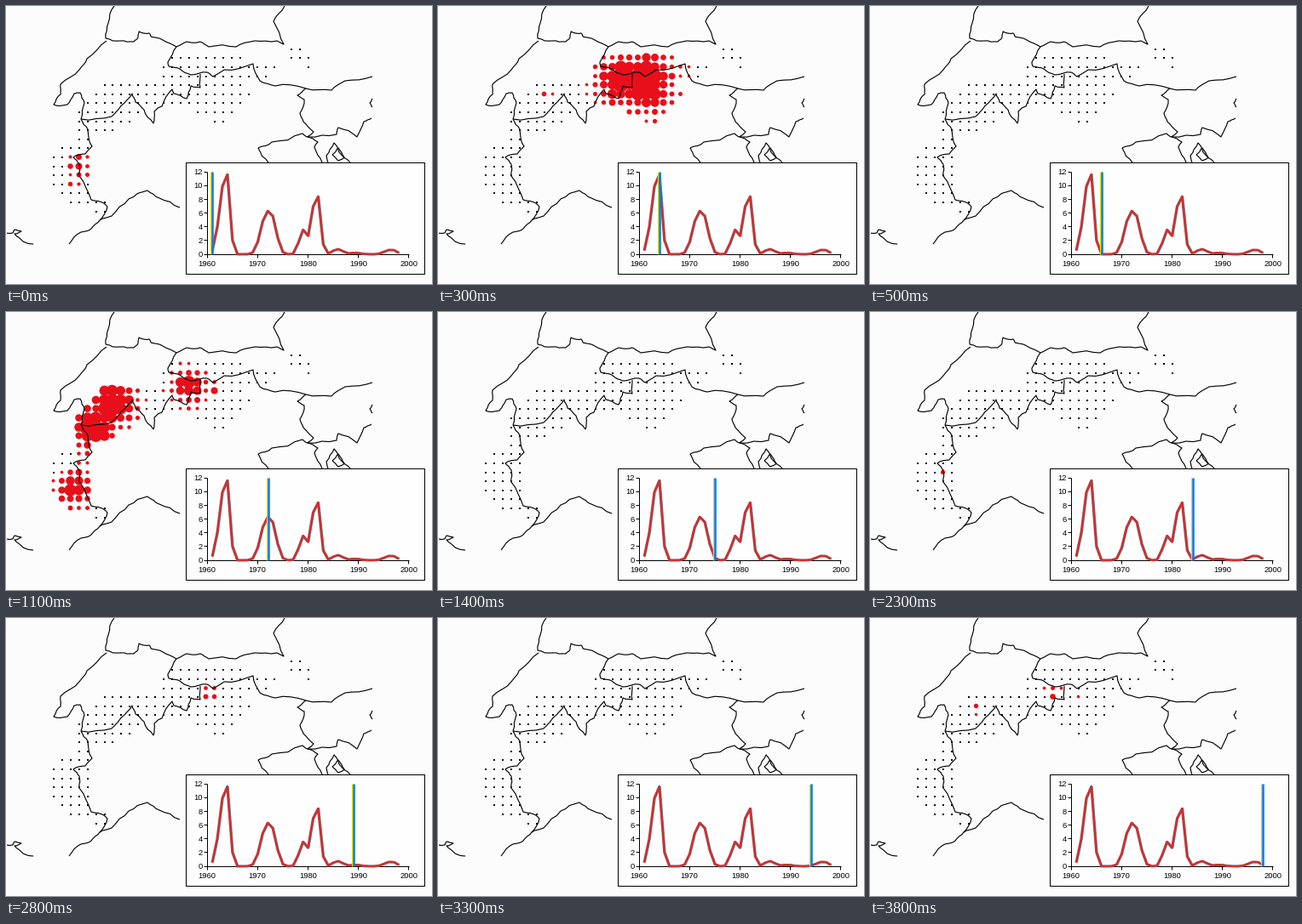
A matplotlib script for the animation above (3.9 s loop, 500 by 327 pixels).

```python
import numpy as np
import matplotlib.pyplot as plt
from matplotlib.animation import FuncAnimation
from matplotlib.patches import Rectangle
from matplotlib.path import Path

W, H, DPI = 500, 327, 100
PX = 72 / DPI
RED = "#e80f1a"

# Outlines of the survey areas, in grid columns and rows
AREAS = [
    [(12.5, 1.5), (15.5, .5), (21.5, .5), (23, 1.4), (26.5, 1.5), (25.5, 3.5),
     (22.5, 3.5), (23.5, 5.2), (21, 7.5), (20, 8.5), (16.5, 7.4), (16.5, 6.5),
     (10.5, 6.5), (10.3, 7.5), (7, 9.5), (4.4, 9.5), (4.4, 16.5), (6.5, 16.6),
     (6.5, 18.4), (4.6, 18.4), (4.5, 17.5), (1.6, 17.5), (-.4, 14.5),
     (-.4, 12.6), (.6, 10.6), (2.6, 10.2), (2.5, 7.4), (6.4, 3.6), (12.5, 3.5)],
    [(27.5, -.5), (29.5, -.5), (30.5, 1), (30.5, 2.5), (29.6, 2.5), (29.4, 1.5),
     (27.5, 1.5)],
]
grid = np.array([(c, r) for r in range(19) for c in range(31)], float)
cells = grid[np.any([Path(a).contains_points(grid) for a in AREAS], axis=0)]
sites = np.floor([55.2, 50.2] + cells * [9.97, 10.6]) + .5

# Peaks of the outbreak index: year, height, years of rise and of fall
PEAKS = [(1963.9, 11.7, 1.85, .88), (1972.2, 6.35, 2, 1.8),
         (1979.1, 3.5, 1.2, .8), (1981.8, 8.6, 1.5, .95), (1986, .75, 1.5, 1.2),
         (1989.3, .2, 1.5, 1.5), (1996.5, .65, 1.8, 1.4)]
# Each wave runs along the route (column, row) between two years
ROUTE = [(3, 13), (2.5, 15), (4.6, 8), (7, 5.2), (16, 3.5), (18.6, 3.7)]
WAVES = [(1961, 1964.2), (1971.1, 1972.9), (1978.8, 1982), (1984, 1989),
         (1996, 1998.6)]


def index(year):
    year = np.asarray(year, float)
    return sum(h * np.exp(-(np.abs(year - p) / np.where(year < p, rise, fall)) ** 2.5)
               for p, h, rise, fall in PEAKS)


def radii(year):
    strength = 6 * index(year) ** .27
    size = np.zeros(len(cells))
    for wave in WAVES:
        for centre, peak in zip(ROUTE, np.linspace(*wave, len(ROUTE))):
            top = strength * np.exp(-(year - peak) ** 2)
            reach = .4 + .17 * top
            dist = np.hypot(*(cells - centre).T)
            size = np.maximum(size, top / (1 + (dist / reach) ** 2))
    size *= np.random.RandomState(year).uniform(.75, 1.15, len(cells))
    return np.where(size > 1.7, np.minimum(size, 9.5), 0)


BORDERS = [
    # Switzerland, north
    [(127, 0), (120, 20), (117, 38), (134, 41), (150, 42), (155, 37), (156, 30),
     (168, 32), (170, 36), (184, 40), (200, 48)],
    # Germany and Austria
    [(200, 48), (212, 42), (228, 42), (238, 48), (270, 48), (292, 41), (318, 41),
     (326, 45), (314, 18), (327, 0)],
    # Austria, south
    [(200, 48), (190, 66), (191, 71), (204, 74), (217, 81), (236, 78), (243, 83),
     (256, 75), (290, 68), (298, 88), (316, 94), (352, 97), (382, 99), (398, 88),
     (430, 83)],
    # Switzerland, west
    [(118, 41), (95, 62), (86, 75), (64, 92), (64, 104), (56, 116), (72, 116),
     (80, 103), (87, 102), (92, 114), (88, 133)],
    # Switzerland, south
    [(88, 133), (124, 130), (139, 114), (148, 103), (152, 113), (162, 122),
     (173, 138), (174, 124), (183, 118), (195, 98), (197, 103), (212, 109),
     (217, 94), (228, 96), (228, 80)],
    # France and Italy
    [(88, 133), (96, 145), (101, 165), (93, 174), (79, 178), (86, 186), (86, 200),
     (100, 228), (115, 232), (119, 236), (110, 252)],
    # Coasts
    [(74, 280), (88, 266), (100, 262), (110, 252), (124, 247), (144, 227),
     (166, 217), (180, 226), (204, 237)],
    [(1, 267), (8, 267), (10, 263), (18, 265), (10, 268), (20, 277), (32, 280)],
    [(354, 154), (348, 150), (312, 160), (296, 167), (308, 184)],
    # Slovenia and Croatia
    [(352, 97), (342, 105), (350, 110), (345, 126), (349, 136), (361, 148),
     (354, 154), (388, 151), (390, 143), (412, 154), (420, 136), (429, 132)],
    [(354, 154), (366, 160), (362, 166), (371, 184)],
    [(378, 184), (376, 176), (385, 161), (391, 172), (404, 184)],
    [(383, 175), (390, 167), (397, 178), (390, 182), (383, 175)],
    [(430, 109), (427, 114), (430, 119)],
]


def roughen(points, rng, levels=2):
    """Displace segment midpoints in proportion to segment length."""
    p = np.array(points, float)
    for _ in range(levels):
        step = np.diff(p, axis=0)
        shift = rng.uniform(-.09, .09, (len(step), 1)) * step[:, ::-1] * [-1, 1]
        out = np.empty((2 * len(p) - 1, 2))
        out[::2], out[1::2] = p, p[:-1] + step / 2 + shift
        p = out
    return p


def chart_x(year):
    return 236 + 5.92 * (np.asarray(year) - 1960)


def chart_y(value):
    return 292 - 8.05 * np.asarray(value)


fig = plt.figure(figsize=(W / DPI, H / DPI), dpi=DPI, facecolor="#fcfcfc")
ax = fig.add_axes([0, 0, 1, 1])
ax.set(xlim=(0, W), ylim=(H, 0))
ax.axis("off")


def stroke(xs, ys, color="black", width=1.0, z=3):
    return ax.plot(xs, ys, color=color, lw=width * PX, zorder=z,
                   solid_joinstyle="round", solid_capstyle="butt")[0]


def label(x, y, text, align):
    ax.text(x, y, text, ha=align, va="center_baseline", zorder=6,
            family="Liberation Sans", size=9.4 * PX)


ax.scatter(*sites.T, s=(1.9 * PX) ** 2, c="black", marker="s", lw=0, zorder=1)
blobs = ax.scatter(*sites.T, s=0, c=RED, lw=0, zorder=2)

rng = np.random.RandomState(4)
for border in BORDERS:
    stroke(*roughen(border, rng).T, width=1.15)

# Chart panel
ax.add_patch(Rectangle((210.5, 183.5), 280, 131, fc="#fefefe", ec="black",
                       lw=PX, zorder=4))
left, base = 235.5, 291.5
stroke([left, left], [195, base], z=5)
stroke([left, 472.5], [base, base], z=5)
for value in range(0, 13, 2):
    y = float(chart_y(value)) - .5
    stroke([left - 3.5, left], [y, y], z=5)
    label(231, y, str(value), "right")
for year in range(1960, 2001, 10):
    x = float(chart_x(year)) - .5
    stroke([x, x], [base, base + 4], z=5)
    label(x + .5, 302.5, str(year), "center")

years = np.arange(1961, 1999)
stroke(chart_x(years) + .8, chart_y(index(years)), "#25a5a8", 2.4, 7)
stroke(chart_x(years), chart_y(index(years)), "#cf3032", 2.8, 8)
glow = stroke([0, 0], [195, 292], "#d8e800", 1.2, 9)
bar = stroke([0, 0], [195, 292], "#1478e8", 2.6, 10)


def update(frame):
    # 1997 is held for two steps
    year = 1961 + frame - (frame > 36)
    blobs.set_sizes((2 * radii(year) * PX) ** 2)
    x = float(chart_x(year))
    bar.set_xdata([x + .5] * 2)
    glow.set_xdata([x - 1.5] * 2)
    return blobs, glow, bar


anim = FuncAnimation(fig, update, frames=39, interval=100, repeat=True,
                     repeat_delay=0, blit=False)
plt.show()
```
